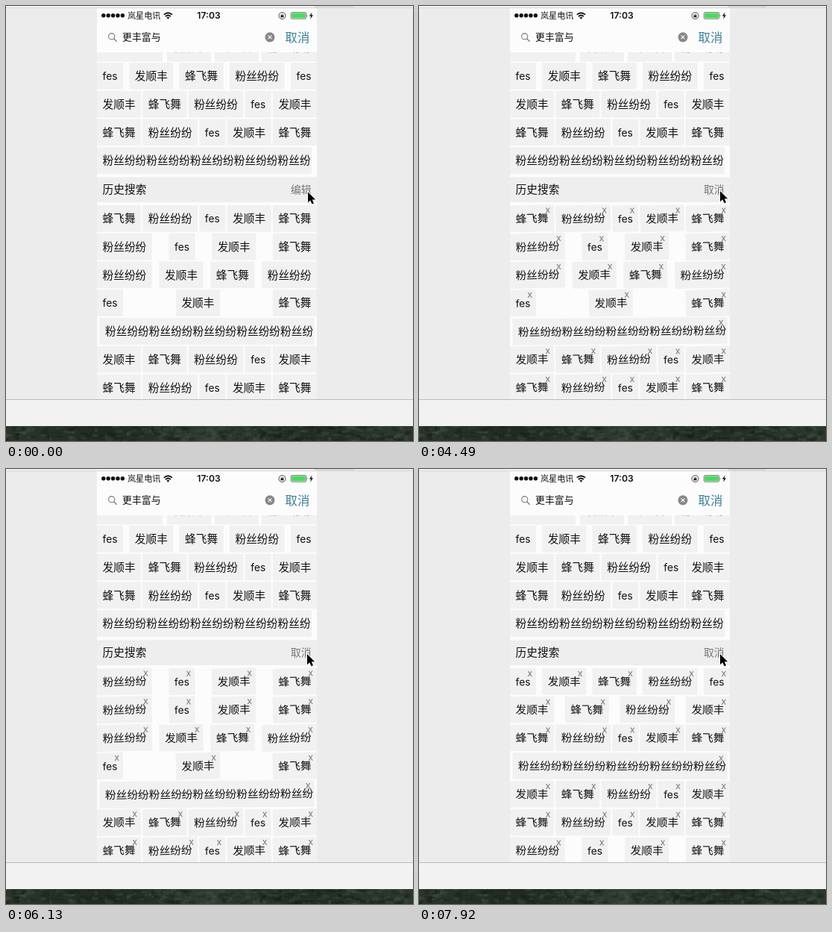
Write an HTML page that moves like this. It is 546 by 583 pixels and loops after 8 s.

```html
<!DOCTYPE html>
<html lang="zh">
<head>
<meta charset="utf-8">
<style>
html, body { margin: 0; width: 100%; height: 100%; overflow: hidden; background: #ececec; }
svg { display: block; width: 546px; height: 583px; }
text { font-family: Inter, "Noto Sans CJK SC", "Noto Sans CJK", sans-serif; fill: #111; }
.chip rect { fill: #f1f1f1; }
.chip text { font-size: 14.7px; }
.chip .latin { font-size: 13.8px; }
.chip .close { font-size: 12.8px; fill: #777; text-anchor: middle; }
</style>
</head>
<body>
<svg viewBox="0 0 546 583">
  <defs>
    <clipPath id="list"><rect x="122" y="62" width="295" height="465"/></clipPath>
    <linearGradient id="photo">
      <stop offset="0" stop-color="#2a352b"/><stop offset=".25" stop-color="#202a21"/>
      <stop offset=".5" stop-color="#303c31"/><stop offset=".75" stop-color="#222c23"/>
      <stop offset="1" stop-color="#2d392e"/>
    </linearGradient>
    <clipPath id="strip"><rect y="563" width="546" height="20"/></clipPath>
  </defs>
  <rect width="546" height="583" fill="#ececec"/>
  <rect width="414" height="2" fill="#f4f4f4"/>
  <rect x="414" width="52" height="2" fill="#dcdcdc"/>
  <rect y="2" width="546" height="1" fill="#d4d4d4"/>
  <rect x="122" y="3" width="295" height="524" fill="#fcfcfc"/>

  <g clip-path="url(#list)">
    <g class="chip" id="cutRow"></g>
    <g id="hot"></g>
    <rect x="122" y="229.5" width="295" height="33.5" fill="#eeeeee"/>
    <text x="129.6" y="251" font-size="14.7">历史搜索</text>
    <text id="action" x="382" y="251" font-size="13.8" style="fill:#777"></text>
    <g id="history"></g>
  </g>

  <g id="statusBar">
    <g id="signal"></g>
    <text x="163" y="16.6" font-size="11.1">岚星电讯</text>
    <g fill="none" stroke="#111" stroke-width="1.8">
      <path d="M211.8 11.6Q217.4 6.8 223 11.6"/>
      <path d="M213.9 14Q217.4 11 220.9 14"/>
    </g>
    <path d="M215.4 15.6Q217.4 14 219.4 15.6L217.4 17.7Z" fill="#111"/>
    <text x="272" y="17" font-size="12.2" font-weight="600" text-anchor="middle">17:03</text>
    <circle cx="370.5" cy="13" r="4.5" fill="none" stroke="#333" stroke-width=".9"/>
    <path d="M368.5 12.3h4v3h-4z" fill="#222"/>
    <path d="M369.4 12.4v-.8q1.1-1.8 2.2 0v.8" fill="none" stroke="#222" stroke-width=".7"/>
    <rect x="382.2" y="8.6" width="20.6" height="8.6" rx="1.8" fill="#fff" stroke="#555" stroke-width=".8"/>
    <rect x="383.2" y="9.6" width="18.6" height="6.6" rx=".8" fill="#4cd95f"/>
    <path d="M403.6 11.4q1.8 1.6 0 3.2z" fill="#555"/>
    <path d="M410.6 8.2L406.8 13.6H409.2L408 17.8L412 12.2H409.6Z" fill="#111"/>
  </g>

  <g id="searchBar">
    <circle cx="141.7" cy="40.7" r="4.1" fill="none" stroke="#777" stroke-width="1.1"/>
    <path d="M144.7 43.8L148.6 47.7" stroke="#777" stroke-width="1.3"/>
    <text x="156" y="46.3" font-size="12.9">更丰富与</text>
    <circle cx="354" cy="41.8" r="6.5" fill="#87878a"/>
    <path d="M351.6 39.4l4.8 4.8m0-4.8l-4.8 4.8" stroke="#fff" stroke-width="1.1"/>
    <text x="374.6" y="48" font-size="16.4" style="fill:#3b7f98">取消</text>
  </g>

  <rect y="527" width="546" height="1" fill="#b9b9b9"/>
  <rect y="528" width="546" height="35" fill="#f2f2f2"/>
  <rect y="563" width="546" height="20" fill="url(#photo)"/>
  <g id="leaves" clip-path="url(#strip)"></g>

  <path id="cursor" d="M0 0V14.2L3.2 11.2L5.5 16.3L8 15.2L5.8 10.3H10.2Z" fill="#000" stroke="#fff" stroke-width="2" paint-order="stroke"/>
</svg>
<script>
const LOOP = 8000, LEFT = 122, WIDTH = 295, PITCH = 37.75, CHIP_H = 35.6;
const F = "fes", S = "发顺丰", B = "蜂飞舞", P = "粉丝纷纷", LONG = P.repeat(4) + "粉丝纷";
const hotItems = [F, S, B, P, F, S, B, P, F, S, B, P, F, S, B, LONG];
const historyItems = [B, P, F, S, B, P, F, S, B, P, S, B, P, F, S, B, LONG,
  S, B, P, F, S, B, P, F, S, B, P, F, S, B, P, S, B, P];

const STEP = 148;
const bursts = [
  [3740, [-.6, 1, -.6, .2]],
  [4490, [-.6, 1, -.6, .2]],
  [5230, [1, -.6, .2]],
  [5830, [-.6, 1, -.6, .2]],
  [6580, [1, -.6, .2]],
  [7180, [-.6, 1, -.6, .2]],
  [7920, [.1]]
];
const EDIT_AT = 3740, removals = [5526, 6876];

const $ = id => document.getElementById(id);
const chipWidth = word => word === F ? 35 : word === LONG ? 288 : word.length * 14.7 + 15;
const maxAngle = word => word === LONG ? 0.75 : 2.2;

function layout(items, firstY) {
  const rows = [];
  let row = [], used = 0;
  for (const word of items) {
    const w = chipWidth(word);
    if (row.length && used + w + 2 * row.length > WIDTH) {
      rows.push(row);
      row = [];
      used = 0;
    }
    row.push({ word, w });
    used += w;
  }
  rows.push(row);
  rows.forEach((cells, r) => {
    const free = WIDTH - cells.reduce((sum, c) => sum + c.w, 0);
    const single = cells.length === 1, last = r === rows.length - 1;
    const gap = single ? 0 : free / (cells.length - 1);
    let x = LEFT + (single && !last ? free / 2 : 0);
    for (const c of cells) {
      c.x = x;
      c.y = firstY + r * PITCH;
      x += c.w + gap;
    }
  });
  return rows.flat();
}

function chip({ word, w, x, y }, tilt = 0, closable = false) {
  const latin = word === F;
  return `<g class="chip" transform="translate(${x + w / 2} ${y}) rotate(${tilt * maxAngle(word)})">
    <rect x="${-w / 2}" y="${-CHIP_H / 2}" width="${w}" height="${CHIP_H}"/>
    <text ${latin ? 'class="latin"' : ""} x="${7.5 - w / 2}" y="5.4">${word}</text>
    ${closable ? `<text class="close" x="${w / 2 - 8.2}" y="-6.8">x</text>` : ""}</g>`;
}

function drawStatic() {
  $("hot").innerHTML = layout(hotItems, 93.8).map(c => chip(c)).join("");
  $("cutRow").innerHTML = [[122, 88, ""], [216, 59, S], [280, 59, B], [343, 74, P]].map(([x, w, word]) =>
    `<rect x="${x}" y="40" width="${w}" height="34.5"/>
     <text x="${x + 7.5}" y="61.4" opacity=".3">${word}</text>`).join("");
  $("signal").innerHTML = [0, 1, 2, 3, 4].map(i =>
    `<circle cx="${130.8 + i * 6.4}" cy="12.8" r="2.7" fill="#111"/>`).join("");
  let seed = 7;
  const random = () => (seed = seed * 16807 % 2147483647) / 2147483647;
  $("leaves").innerHTML = Array.from({ length: 280 }, () =>
    `<ellipse cx="${random() * 546}" cy="${563 + random() * 20}" rx="${1.5 + random() * 5}" ry="${1 + random() * 2.5}"
      fill="${random() < .5 ? "#4a5a4a" : "#121a13"}" opacity=".3"/>`).join("");
}

function tiltAt(t) {
  const burst = bursts.filter(([start]) => t >= start).pop();
  if (!burst) return 0;
  const [start, tilts] = burst;
  return tilts[Math.min(tilts.length - 1, Math.floor((t - start) / STEP))];
}

let shown = "";
function draw(t) {
  const editing = t >= EDIT_AT;
  const removed = removals.filter(at => t >= at).length;
  const tilt = tiltAt(t);
  const key = [editing, removed, tilt].join();
  if (key !== shown) {
    shown = key;
    $("history").innerHTML = layout(historyItems.slice(removed), 284.8)
      .filter(c => c.y < 550).map(c => chip(c, tilt, editing)).join("");
  }
  $("action").textContent = !editing ? "编辑" : t < EDIT_AT + STEP ? "" : "取消";
  const [x, y] = t < 740 ? [405, 249.3] : t < 890 ? [404.5, 248.7] : [404, 248];
  $("cursor").setAttribute("transform", `translate(${x} ${y})`);
}

drawStatic();
const origin = performance.now();
function tick() {
  draw((performance.now() - origin) % LOOP);
  requestAnimationFrame(tick);
}
tick();
</script>
</body>
</html>
```
